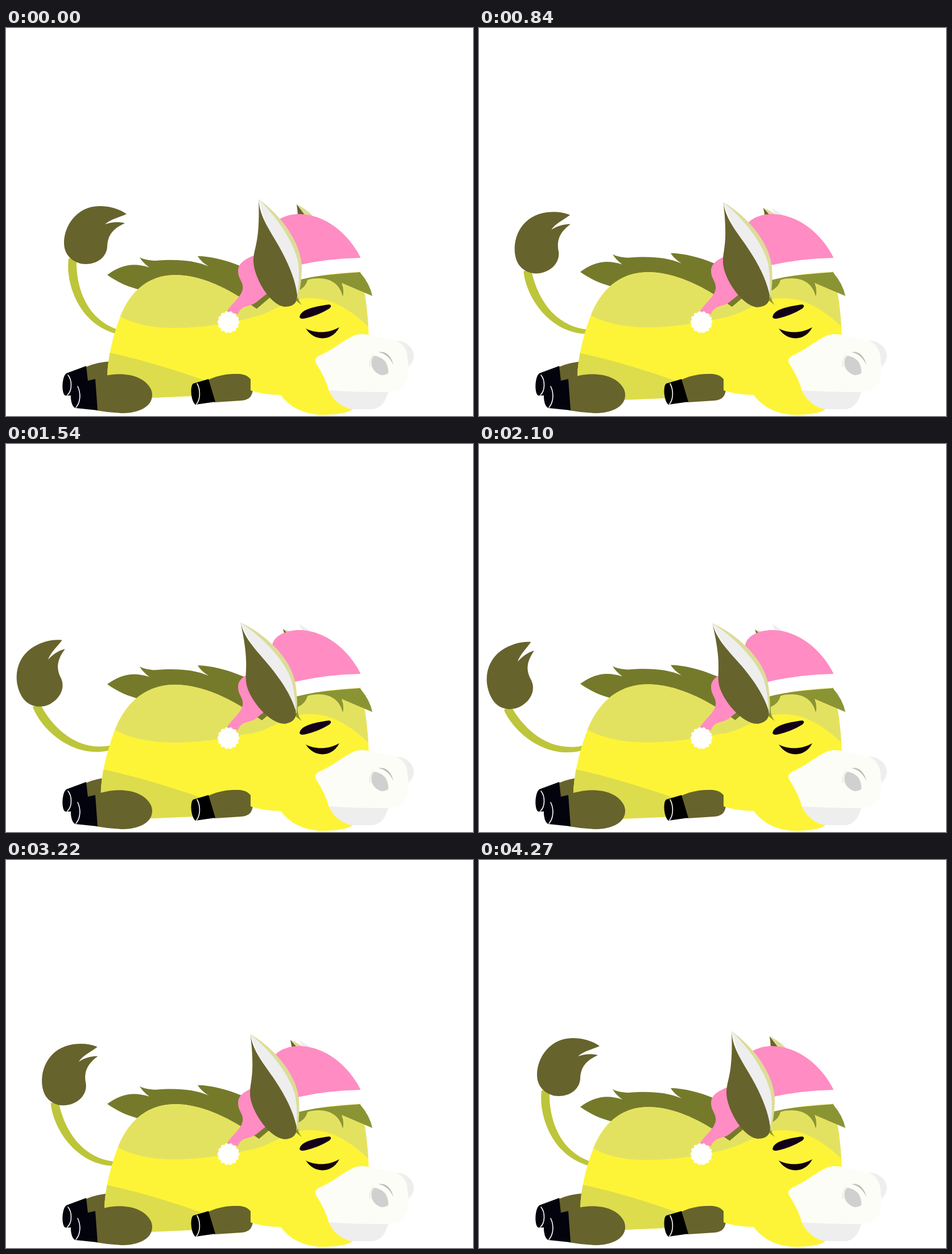
Write an HTML page that moves like this. It is 821 by 682 pixels and loops after 4410 ms.

```html
<!DOCTYPE html>
<html lang="en">
<head>
<meta charset="utf-8">
<title>Sleeping donkey</title>
<style>
  @property --tick {
    syntax: "<number>";
    inherits: true;
    initial-value: 0;
  }

  html, body {
    margin: 0;
    width: 100%;
    height: 100%;
    overflow: hidden;
    background: #fff;
  }

  svg {
    display: block;
    width: 100%;
    height: 100%;
  }

  /* 63 ticks of 70 ms: inhale for 27, exhale for 34, then rest */
  .donkey {
    animation: tick 4410ms steps(63) infinite;
    --phase: calc(min(var(--tick) / 27, 1) + clamp(0, (var(--tick) - 27) / 34, 1));
    --breath: calc((1 - cos(var(--phase) * 180deg)) / 2);
  }

  @keyframes tick {
    from { --tick: 0; }
    to { --tick: 63; }
  }

  .tail {
    transform-origin: 190px 533px;
    transform: translate(calc(var(--breath) * -12px), calc(var(--breath) * 3px))
               rotate(calc(var(--breath) * -31.5deg));
  }

  .mane { transform: translateY(calc(var(--breath) * -12.7px)); }

  .body {
    transform-origin: 307px 557px;
    transform: scale(calc(1 + var(--breath) * .098));
  }

  .ear {
    transform-origin: 500px 485px;
    transform: rotate(calc(var(--breath) * -11.1deg));
  }

  .far-ear { transform-origin: 584px 453px; }

  .coat { fill: #fdf438; }
  .light { fill: #e3e260; }
  .belly { fill: #dddc4d; }
  .dark { fill: #67632c; }
  .hair { fill: #757a2b; }
  .fringe { fill: #8b9433; }
  .rim { fill: #dcdc98; }
  .pale { fill: #eeeeef; }
  .pink { fill: #ff8cc2; }
  .white { fill: #fff; }
  .hoof { fill: #03030e; }
  .shine { fill: none; stroke: #fff; stroke-width: 1.6; stroke-linecap: round; }
</style>
</head>
<body>
<svg class="donkey" viewBox="0 0 821 682">
  <defs>
    <path id="torso" d="M178 612C179 578 188 541 201 507C216 469 245 434 299 434C344 435 385 457 411 473L441 494L470 512L450 600Q440 624 425 630L400 640L325 647L257 650Q205 648 178 612Z"/>
    <clipPath id="torso-clip"><use href="#torso"/></clipPath>
  </defs>

  <g class="tail">
    <path fill="#bdc53a" d="M110 405C104 450 130 525 200 539L203 532C145 517 122 460 124 405Z"/>
    <path class="dark" d="M212 327C198 317 180 313 165 313C125 313 102 347 102 378C102 402 122 415 140 415C160 415 177 403 178 384C179 362 190 352 209 343C198 340 185 341 174 345C184 336 196 334 212 327Z"/>
  </g>

  <!-- far hind leg -->
  <path class="dark" d="M140 596Q160 587 185 586L210 612L143 622Z"/>
  <path class="hoof" d="M106 607L141 594L145 630L113 646H104C97 642 98 613 106 607Z"/>
  <path class="shine" d="M109 610C117 620 116 638 108 645"/>

  <path class="mane hair" d="M178 434C200 418 222 411 252 421Q240 412 235 403Q244 408 262 409C300 406 330 408 356 419Q343 411 337 401C360 401 390 409 411 418L470 440L490 510H430L300 480L240 461C215 456 195 446 178 434Z"/>

  <g class="body">
    <use class="coat" href="#torso"/>
    <g clip-path="url(#torso-clip)">
      <path class="light" d="M180 425H480V494C450 507 410 515 372 521C310 531 243 531 201 507L170 490Z"/>
      <path class="belly" d="M170 568C240 583 290 599 345 618Q380 631 420 652L170 670Z"/>
    </g>
  </g>

  <!-- near legs -->
  <path class="dark" d="M154 617C180 608 200 607 217 610C240 614 257 629 257 645C257 667 231 677 203 677Q180 676 158 672Z"/>
  <path class="hoof" d="M118 630L143 625V620L157 617L161 672L122 668C112 664 112 636 118 630Z"/>
  <path class="shine" d="M126 630C132 642 131 658 123 667"/>
  <path class="dark" d="M354 619C375 609 392 608 407 608C425 608 434 617 434 632C434 648 427 654 412 655L366 658Z"/>
  <path fill="#000" d="M329 625L356 617L368 657L333 662C325 656 323 630 329 625Z"/>
  <path class="shine" d="M336 625C342 636 342 652 335 661"/>

  <!-- head -->
  <path class="coat" d="M438 496L470 469L530 430L622 425C630 460 636 500 638 545L640 660L609 670C600 678 575 680 556 680C525 679 500 668 483 645Q455 645 430 637V510Z"/>
  <path class="light" d="M438 496L470 469L530 430L622 425C630 455 635 490 637 525C610 500 580 477 540 475C510 473 490 486 470 495Q450 505 428 510Z"/>
  <path class="fringe" d="M500 440L622 429Q640 450 644 471L590 448Q595 461 592 472C588 454 575 440 550 440Q536 440 530 443Q527 456 513 462Q511 476 520 487L498 470Z"/>
  <path fill="#130018" d="M517 505C521 494 545 489 568 486C573 487 572 491 567 494C552 503 535 509 522 511C517 511 515 509 517 505Z"/>
  <path fill="#120008" d="M527 528C540 536 566 538 586 526C573 552 541 551 527 528Z"/>

  <!-- muzzle -->
  <path class="pale" d="M678 550C703 546 717 563 717 577Q716 590 706 596L680 590Z"/>
  <path class="pale" d="M566 634C574 653 590 667 608 670H645Q667 667 673 634Z"/>
  <path fill="#fcfdf6" d="M544 583Q545 578 555 574C575 565 594 548 613 540Q625 536 640 540L682 549C700 553 707 570 706 585Q709 595 707 612C704 633 690 639 665 640Q615 640 568 637Q561 615 548 594Q543 587 544 583Z"/>
  <path fill="#d0d0d0" d="M648 576Q661 578 668 588Q673 598 672 607Q666 611 659 610C646 605 640 594 643 583Q644 578 648 576Z"/>
  <path fill="none" stroke="#ddd" d="M646 574Q637 584 640 596"/>
  <path fill="#b9bab3" d="M655 570C669 567 678 579 681 592C675 580 668 572 655 570Z"/>

  <path class="pale" d="M515 316L522 332H540Z"/>
  <g class="ear far-ear">
    <path class="rim" d="M511 310Q526 317 537 328L552 350H514Z"/>
    <path class="dark" d="M511 310L524 327L540 350H514Q514 328 511 310Z"/>
  </g>

  <!-- nightcap -->
  <path class="pink" d="M624 405C603 361 560 327 515 327C490 327 468 339 468 356L450 395C428 402 408 410 408 427C408 442 418 446 416 459C413 474 397 483 388 499L408 503C413 486 429 491 440 482L470 458L520 425Z"/>
  <path class="white" d="M500 420Q560 405 624 404L622 429Q565 430 505 445Z"/>
  <circle class="white" cx="391" cy="517" r="15.5" stroke="#fff" stroke-width="7.5" stroke-linecap="round" stroke-dasharray="0 6.955"/>

  <g class="ear">
    <path class="rim" d="M444 301C485 330 521 380 520 425Q519 455 513 475L500 480Z"/>
    <path class="pale" d="M444 301C479 335 507 378 514 415Q517 445 511 474L495 470Z"/>
    <path class="dark" d="M444 301C446 333 465 357 480 384C499 418 509 445 512 470C512 485 503 490 490 490C464 487 436 439 435 410C435 385 447 380 444 301Z"/>
  </g>
</svg>
</body>
</html>
```
